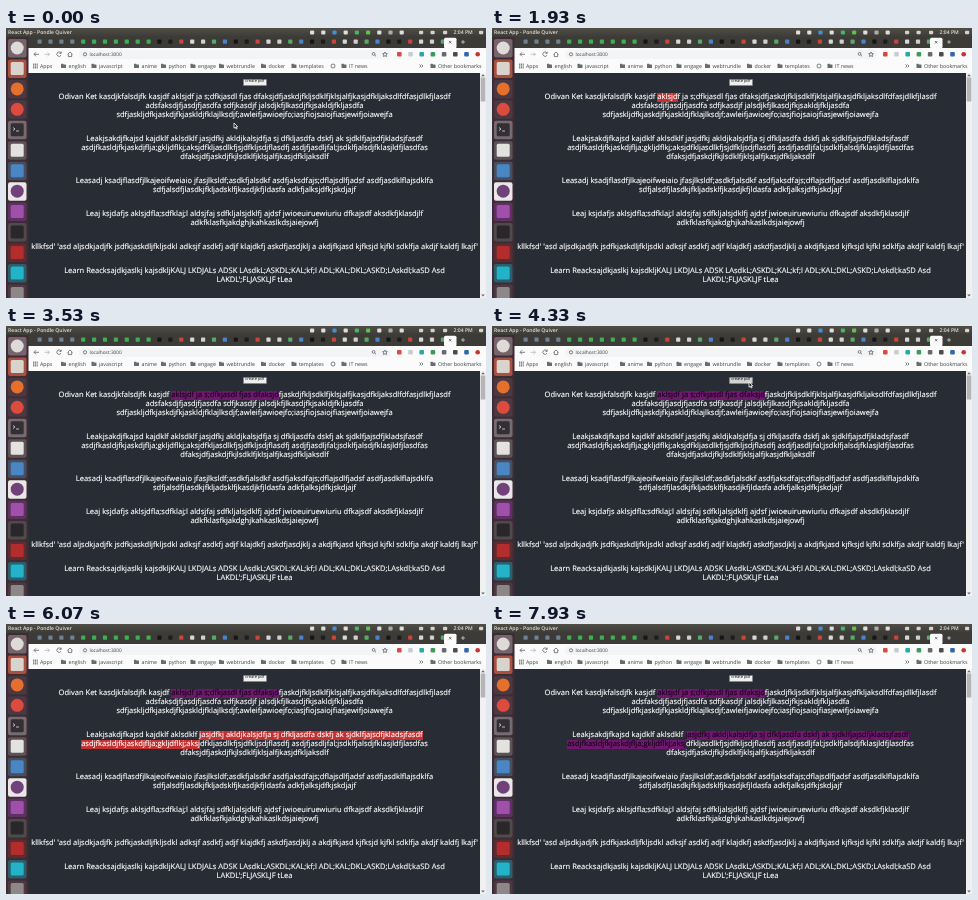
An HTML page that plays this animation: 480 by 270 pixels, repeating every 8000 ms.

```html
<!DOCTYPE html>
<html lang="en">
<head>
<meta charset="utf-8">
<title>React App</title>
<style>
  html, body { margin: 0; width: 100%; height: 100%; overflow: hidden; background: #282c34; }
  body { position: relative; font-family: "Open Sans", "Noto Sans", sans-serif; text-rendering: geometricPrecision; }
  svg { position: absolute; left: 0; top: 0; width: 480px; height: 270px; }
  svg text { font-size: 5.3px; fill: #3c4043; }
  svg .light { fill: #e4e1da; font-weight: 600; font-size: 5.1px; }
  main { position: absolute; left: 22px; top: 65.2px; width: 453px; }
  p {
    margin: 0 0 15.1px; text-align: center; white-space: pre; color: #fff;
    font-size: 7.55px; line-height: 8.95px; -webkit-text-stroke: .15px;
  }
  mark {
    display: inline-block; height: 8.95px; vertical-align: top; color: #fff;
    background: linear-gradient(#c42f30, #c42f30) no-repeat 0 0 / 0 100%;
    animation: 8s linear infinite;
  }
  .first { animation-name: first; }
  .upper { animation-name: upper; }
  .lower { animation-name: lower; }
  .button {
    position: absolute; left: 237px; top: 51px; width: 23.5px; height: 6.6px;
    box-sizing: border-box; border: .5px solid #85878b; border-radius: 1px;
    background: #efefef; color: #111; white-space: nowrap;
    font-size: 4px; line-height: 4.8px; text-align: center;
    animation: hover 8s step-end infinite;
  }
  .arrow { animation: move 8s linear infinite, show 8s step-end infinite; }

  /* Selection grows in red, then turns into a purple highlight. */
  @keyframes first {
    0%, 20% { background-size: 0 100%; background-color: transparent; color: #fff; }
    41.25%, 43.4% { background-size: 100% 100%; background-color: transparent; color: #fff; }
    43.41%, 100% { background-size: 0 100%; background-color: #701870; color: #160416; }
  }
  @keyframes upper {
    0%, 62.5% { background-size: 0 100%; background-color: transparent; color: #fff; }
    70% { background-size: 36% 100%; }
    70.01%, 79.9% { background-size: 100% 100%; background-color: transparent; color: #fff; }
    79.91%, 100% { background-size: 0 100%; background-color: #701870; color: #160416; }
  }
  @keyframes lower {
    0%, 70% { background-size: 0 100%; background-color: transparent; color: #fff; }
    70.01%, 79.9% { background-size: 100% 100%; background-color: transparent; color: #fff; }
    79.91%, 100% { background-size: 0 100%; background-color: #701870; color: #160416; }
  }
  @keyframes hover {
    0%, 100% { background: #efefef; }
    51.5% { background: #d2d2d2; }
    56.5% { background: #efefef; }
  }
  @keyframes move {
    0%, 4% { transform: translate(228px, 95px); }
    14.1% { transform: translate(181px, 65px); }
    19%, 20% { transform: translate(164px, 69px); }
    41.25%, 44% { transform: translate(271px, 69px); }
    52%, 55% { transform: translate(257px, 56px); }
    61.5%, 62.5% { transform: translate(194px, 111px); }
    70% { transform: translate(275px, 113px); }
    75%, 80% { transform: translate(192px, 119px); }
    87%, 92% { transform: translate(185px, 99px); }
    98%, 100% { transform: translate(188px, 151px); }
  }
  @keyframes show {
    0% { opacity: 1; }
    18% { opacity: 0; }
    45% { opacity: 1; }
    60.5% { opacity: 0; }
    83% { opacity: 1; }
    97%, 100% { opacity: 0; }
  }
</style>
</head>
<body>
<svg id="frame" viewBox="0 0 480 270">
  <defs>
    <linearGradient id="bar" x2="0" y2="1">
      <stop stop-color="#504e47"/><stop offset="1" stop-color="#3c3b37"/>
    </linearGradient>
  </defs>
  <rect width="480" height="9" fill="url(#bar)"/>
  <rect x="22" y="9" width="458" height="11" fill="#3c3b37"/>
  <rect x="22" y="20" width="458" height="25" fill="#fbfbfb"/>
  <rect x="73" y="22" width="312" height="9" rx="4.5" fill="#f3f4f5"/>
  <rect y="9" width="22.5" height="261" fill="#3d2c34"/>
  <rect x="474" y="45" width="6" height="225" fill="#f1f1f1"/>
  <rect x="474.7" y="49.5" width="4.6" height="24" fill="#b5b5b5"/>
  <path d="M475.2 48.2l1.8-2 1.8 2z" fill="#666"/>
  <path d="M475.2 266.5l1.8 2 1.8-2z" fill="#666"/>
  <text class="light" x="2" y="6.2">React App - Pondle Quiver</text>
  <text class="light" x="447.5" y="6.2">2:04 PM</text>
  <text x="83.5" y="28" style="font-size:4.8px">localhost:3000</text>
  <g fill="none" stroke="#5f6368" stroke-width=".8">
    <path d="M33 26.3h-5m2-2l-2 2 2 2" />
    <path d="M38.5 26.3h5m-2-2l2 2-2 2" stroke="#b5b8bb"/>
    <path d="M54.8 24.8a2.2 2.2 0 1 0 .2 2.4m.2-3.6v1.8h-1.8"/>
    <path d="M61.5 26.3l2.5-2.3 2.5 2.3M62.3 26v2.6h3.4V26"/>
    <circle cx="79" cy="26.3" r="1.6"/>
    <circle cx="367.6" cy="25.9" r="1.4"/>
    <path d="M368.7 27l1.3 1.3M379 24l.7 1.5 1.7.2-1.2 1.2.3 1.6-1.5-.8-1.5.8.3-1.6-1.2-1.2 1.7-.2z"/>
    <circle cx="327" cy="38" r="2"/>
    <path d="M413.5 36.5l1.5 1.5-1.5 1.5m2-3l1.5 1.5-1.5 1.5"/>
  </g>
</svg>

<div class="button">create pdf</div>

<main>
<p>Odivan Ket kasdjkfalsdjfk kasjdf <mark class="first">aklsjdf ja s;dfkjasdl fjas dfaksjd</mark>fjaskdjfkljsdklfjklsjalfjkasjdfkljaksdlfdfasjdlkfjlasdf
adsfaksdjfjasdjfjasdfa sdfjkasdjf jalsdjkfjlkasdjfkjsakldjfkljasdfa
sdfjaskljdfkjaskdjfkjaskldjfklajlksdjf;awleifjawioejfo;iasjfiojsaiojfiasjewifjoiawejfa</p>
<p>Leakjsakdjfkajsd kajdklf aklsdklf <mark class="upper">jasjdfkj akldjkalsjdfja sj dfkljasdfa dskfj ak sjdklfjajsdfjkladsjfasdf</mark>
<mark class="lower">asdjfkasldjfkjaskdjflja;gkljdflkj;aksj</mark>dfkljasdlkfjsjdfkljsdjflasdfj asdjfjasdljfal;jsdklfjalsdjfklasjldfjlasdfas
dfaksjdfjaskdjfkjlsdklfjklsjalfjkasjdfkljaksdlf</p>
<p>Leasadj ksadjflasdfjlkajeoifweiaio jfasjlksldf;asdkfjalsdkf asdfjaksdfajs;dflajsdlfjadsf asdfjasdklflajsdklfa
sdfjalsdfjlasdkjfkljadsklfjkasdjkfjldasfa adkfjalksjdfkjskdjajf</p>
<p>Leaj ksjdafjs aklsjdfla;sdfklaj;l aldsjfaj sdfkljalsjdklfj ajdsf jwioeuiruewiuriu dfkajsdf aksdkfjklasdjlf
adkfklasfkjakdghjkahkaslkdsjaiejowfj</p>
<p>kllkfsd' 'asd aljsdkjadjfk jsdfkjaskdljfkljsdkl adksjf asdkfj adjf klajdkfj askdfjasdjklj a akdjfkjasd kjfksjd kjfkl sdklfja akdjf kaldfj lkajf'</p>
<p>Learn Reacksajdkjaslkj kajsdkljKALJ LKDJALs ADSK LAsdkL;ASKDL;KAL;kf;l ADL;KAL;DKL;ASKD;LAskdl;kaSD Asd
LAKDL';FLJASKLJF tLea</p>
</main>

<svg viewBox="0 0 480 270">
  <path class="arrow" d="M0 0V5.2L1.3 4.1 2.2 6 3.1 5.6 2.2 3.8H3.8Z" fill="#111" stroke="#fff" stroke-width=".8"/>
</svg>

<script>
  const frame = document.getElementById('frame');

  function add(tag, attrs, text = '') {
    const node = document.createElementNS('http://www.w3.org/2000/svg', tag);
    for (const key in attrs) node.setAttribute(key, attrs[key]);
    node.textContent = text;
    frame.append(node);
  }
  const dot = (cx, cy, r, fill) => add('circle', { cx, cy, r, fill });
  const box = (x, y, width, height, fill, rx = 0) => add('rect', { x, y, width, height, fill, rx });

  // Tabs: a few dim ones, a run of green ones, then a mix.
  const mixedTabs = ['#d8d8d8', '#1d1d1d', '#4a83c9', '#d0d0d0', '#c8453a', '#161616', '#58a968'];
  for (let i = 0; i < 38; i++) {
    const color = i < 4 ? '#6d8190' : i < 11 ? '#3fae52' : mixedTabs[i * 3 % 7];
    box(31.5 + i * 10.9, 11.6, 4.2, 4.2, color, .8);
  }
  box(438, 9.8, 12.5, 10.5, '#fbfbfb', 1.5);
  add('path', { d: 'M443 13l2.4 2.4m0-2.4l-2.4 2.4', stroke: '#444', 'stroke-width': .7 });
  add('path', { d: 'M455 14h4m-2-2v4', stroke: '#ddd', 'stroke-width': .7 });

  const bookmarks = [
    ['Apps', 34], ['english', 62.5], ['javascript', 93], ['anime', 135.5], ['python', 162.5],
    ['engage', 192], ['webtrundle', 220.5], ['docker', 262.5], ['templates', 293], ['IT news', 343],
    ['Other bookmarks', 432]
  ];
  bookmarks.forEach(([name, x], i) => {
    if (i) {
      box(x - 7.5, 35.8, 2.4, 1.5, '#686c70', .4);
      box(x - 7.5, 36.5, 5, 3.5, '#686c70', .5);
    } else {
      for (let n = 0; n < 9; n++) box(x - 7 + n % 3 * 1.8, 35.6 + (n / 3 | 0) * 1.8, 1.2, 1.2, '#686c70');
    }
    add('text', { x, y: 39.8 }, name);
  });

  ['#d84a45', '#c9ccd0', '#27a9a5', '#3e9a5b', '#66696d', '#4a4d50', '#2f66b5', '#c8322f']
    .forEach((color, i) => box(391 + i * 11.2, 24, 4.6, 4.6, color, i === 7 ? 2.3 : 1));

  const tray = ['#ddd', '#ddd', '#3f8fdb', '#ddd', '#45b36b', '#5fc04f', '#ddd', '#aaa', '#ddd'];
  tray.forEach((color, i) => box(304 + i * 11.2, 2.5, 4.2, 4, color, 1));
  [413, 424.5, 437, 473].forEach(x => box(x, 2.7, 4.2, 3.6, '#d5d2ca', 1));

  const tile = (y, fill) => box(2, y - 9, 18.5, 18.5, fill, 2);
  const apps = [
    ['#75646c', '#dedad8', 1], ['#a9503f', '#d8d4cd'], ['#4a3942', '#e5702b', 1], ['#4a3942', '#dd4b3e', 1],
    ['#756b71', '#332f35'], ['#5c5358', '#e4e2df'], ['#44505f', '#4a86c4'], ['#e9e7e8', '#71427a', 1],
    ['#5d3263', '#a04faa'], ['#504a4d', '#292729'], ['#5b2d30', '#b52c2c'], ['#2b5f6d', '#22b3c9'],
    ['#4a3942', '#8d8788']
  ];
  apps.forEach(([back, front, round], i) => {
    const y = 20 + i * 20.45;
    tile(y, back);
    if (round) dot(11.2, y, 6.5, front);
    else box(4.7, y - 6.5, 13, 13, front, 1.5);
  });
  add('path', { d: 'M7 99.5l2 1.5-2 1.5m3 .5h3', fill: 'none', stroke: '#ddd', 'stroke-width': .8 });
</script>
</body>
</html>
```
